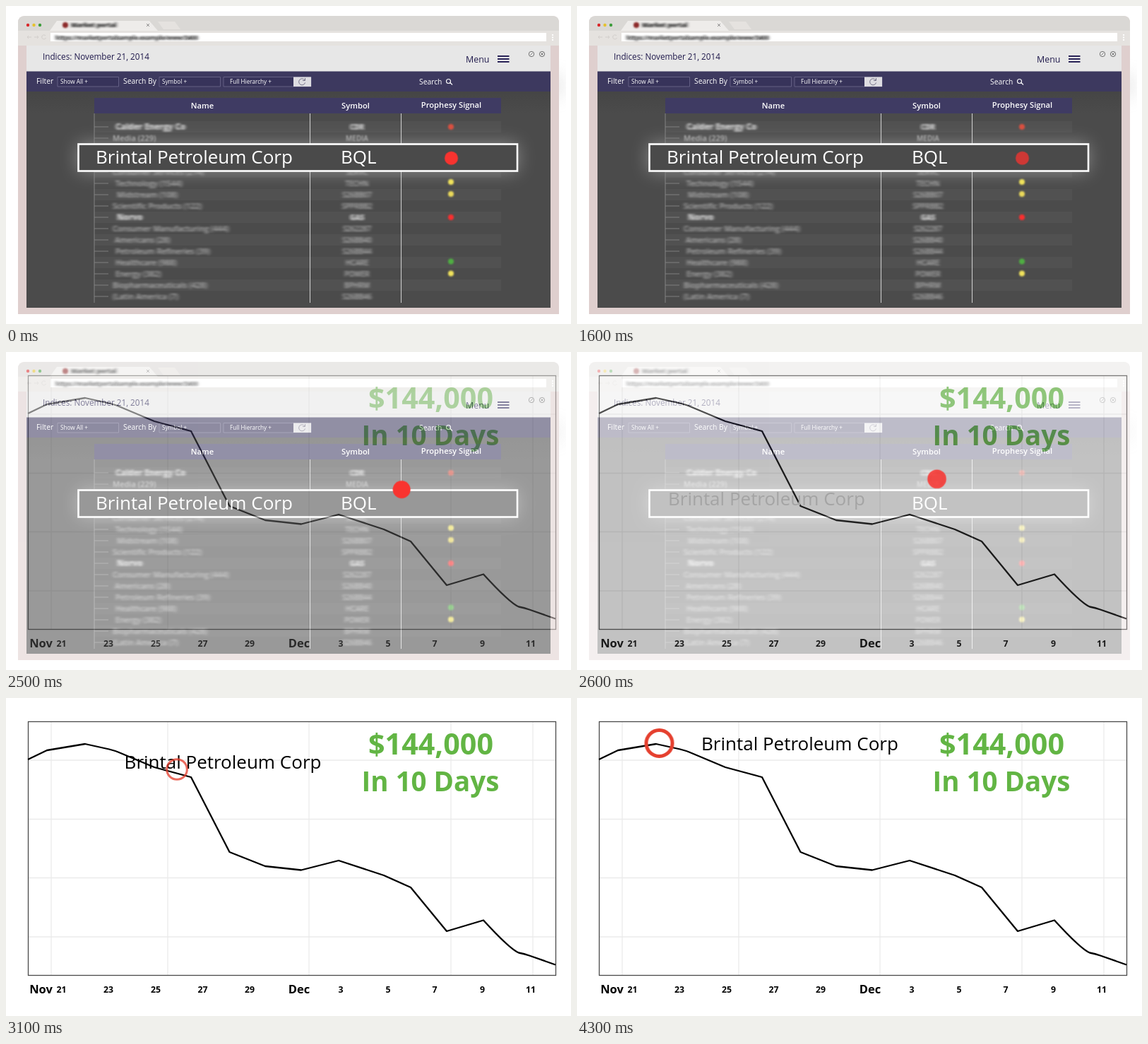
Write an HTML page that moves like this. It is 800 px wide and 450 px high and loops after 4.4 s.

```html
<!DOCTYPE html>
<html lang="en">
<head>
<meta charset="utf-8">
<title>Signal to chart</title>
<style>
  html, body { margin: 0; width: 100%; height: 100%; overflow: hidden; background: #fff; }
  svg { display: block; width: 800px; height: 450px; font-family: "Open Sans", "Noto Sans", sans-serif; }

  .grid { stroke: #ebebeb; stroke-width: 1.3; fill: none; }
  .axis { font-size: 12.3px; font-weight: 700; text-anchor: middle; }
  .axis .month { font-size: 16.5px; }
  .gain { fill: #62b544; font-weight: 700; text-anchor: middle; }
  .navy { fill: #201a4c; }
  .white { fill: #fff; }
  .label { font-size: 10.3px; font-weight: 500; }
  .field { font-size: 8.2px; font-weight: 500; }
  .head { font-size: 11.2px; font-weight: 600; text-anchor: middle; }
  .box { fill: #37335a; stroke: #6f6b8f; stroke-width: .8; }
  .rows { font-size: 11px; font-weight: 600; fill: #b4b4b4; }
  .rows .strong { font-weight: 800; font-size: 11.5px; fill: #d8d8d8; }
  .rows .symbol { text-anchor: middle; font-size: 10px; }
  .big { font-size: 26px; }

  .screen, .company, .mover, .dot, .ring { animation: 4.4s linear infinite; }
  .screen { animation-name: leave; }
  .company { animation-name: rise; }
  .mover { animation-name: travel; }
  .dot { fill: #f93430; animation-name: pulse; }
  .ring { fill: none; stroke: #e5402f; animation-name: open; }

  @keyframes leave {
    0%, 52.5% { opacity: 1; }
    62.5%, 100% { opacity: 0; }
  }
  @keyframes rise {
    0%, 56.8% { transform: translate(127px, 223px); fill: #fff; animation-timing-function: cubic-bezier(.35, 0, .65, 1); }
    62.5% { fill: #000; }
    75.5%, 100% { transform: translate(176px, 74px); fill: #000; }
  }
  @keyframes travel {
    0%, 52.1% { transform: translate(630.5px, 215.3px); animation-timing-function: cubic-bezier(.17, 0, .75, 1); }
    79.1%, 100% { transform: translate(116.5px, 64px); }
  }
  @keyframes pulse {
    0% { opacity: 1; r: 9.5px; animation-timing-function: ease-in-out; }
    24% { opacity: .5; animation-timing-function: ease-in-out; }
    48% { opacity: 1; }
    51.8% { r: 9.5px; }
    56.8% { opacity: 1; r: 12.5px; }
    63.64% { opacity: .6; r: 15px; }
    70.5%, 100% { opacity: 0; r: 18px; }
  }
  @keyframes open {
    0%, 58% { opacity: 0; r: 9px; stroke-width: 1px; }
    63.64% { opacity: .6; r: 11px; stroke-width: 1.5px; }
    79.1%, 100% { opacity: 1; r: 18.5px; stroke-width: 5px; }
  }
</style>
</head>
<body>
<svg viewBox="0 0 800 450">
  <defs>
    <filter id="smear" x="-10%" y="-40%" width="120%" height="180%"><feGaussianBlur stdDeviation="2 .9"/></filter>
    <filter id="soft" x="-50%" y="-50%" width="200%" height="200%"><feGaussianBlur stdDeviation=".8"/></filter>
    <filter id="glow" x="-20%" y="-200%" width="140%" height="500%"><feGaussianBlur stdDeviation="13"/></filter>
    <linearGradient id="shade" x2="0" y2="1">
      <stop stop-color="#454545"/><stop offset=".1" stop-color="#4b4b4b"/><stop offset="1" stop-color="#4b4b4b"/>
    </linearGradient>
  </defs>

  <g class="chart">
    <path class="grid" d="M64 33V392M229 33V392M429 33V392M630 33V392M746 33V392M31 88H778M31 171.500H778M31 254.500H778M31 338H778"/>
    <rect x="31.500" y="33.500" width="747" height="359" fill="none" stroke="#4a4a4a" stroke-width="1.300"/>
    <path fill="none" stroke="#000" stroke-width="2.300" stroke-linejoin="round"
      d="M31 87L58 74L112 65L146 72.500Q154 74.500 160 77L210 98L262 112L316.500 218L367 238L418 243.500L471 230L535 251L573 268L624 330L676 314.500Q713 355 726 360.500Q734 362 741 364.500L778 377.500"/>
    <g class="axis" id="axis"></g>
    <text class="gain" x="601.500" y="79.500" font-size="41.300">$144,000</text>
    <text class="gain" x="601" y="132" font-size="38.500">In 10 Days</text>
  </g>

  <g class="screen">
    <rect x="760" y="100" width="27" height="26" fill="#aaa" opacity=".35" filter="url(#glow)"/>
    <path fill="#dfcfce" d="M17 436V24Q17 14 27 14H773Q783 14 783 24V436Z"/>
    <path fill="#dad8d5" d="M17 56V24Q17 14 27 14H773Q783 14 783 24V56Z"/>
    <path fill="#e5e2df" d="M17 35H783V56H17ZM215 22H239L247 33H223Z"/>
    <path fill="#eeecea" d="M62 35L72 21H203L215 35Z"/>
    <circle cx="31" cy="27" r="2.200" fill="#d9282b"/>
    <circle cx="39.500" cy="27" r="2.200" fill="#e5c12e"/>
    <circle cx="48" cy="27" r="2.200" fill="#3e9d3c"/>
    <circle cx="84" cy="27" r="4" fill="#8c2929" filter="url(#soft)"/>
    <text x="92" y="30" font-size="9" font-weight="800" fill="#222" filter="url(#smear)">Market portal</text>
    <path stroke="#777" stroke-width=".8" d="M199 25l4 4m0-4l-4 4"/>
    <path fill="none" stroke="#d2cecb" d="M36 44h-6m2-2l-2 2 2 2M40 44h6m-2-2l2 2-2 2M56 42a3 3 0 1 0 .5 3"/>
    <rect x="63" y="38" width="702" height="12" class="white"/>
    <text x="70" y="47.500" font-size="8.300" font-weight="700" fill="#111" filter="url(#smear)">https://marketportalsample.example/www/3400</text>
    <path stroke="#fff" stroke-width="2" stroke-dasharray="2 1.500" d="M774 40V49"/>

    <rect x="29" y="56" width="742" height="37" fill="#e7e7e7"/>
    <text class="navy" x="52" y="76" font-size="11.700">Indices: November 21, 2014</text>
    <text class="navy" x="651" y="80" font-size="12.400">Menu</text>
    <path stroke="#2a2458" stroke-width="2.200" d="M696 71H712.500M696 75H712.500M696 79H712.500"/>
    <g fill="none" stroke="#666" stroke-width=".9">
      <circle cx="744" cy="68" r="3.700"/><circle cx="759" cy="68" r="3.700"/>
      <path d="M742.500 69.500l3-3M757.300 66.300l3.400 3.400m0-3.400l-3.400 3.400"/>
    </g>

    <rect x="29" y="121" width="742" height="306" fill="url(#shade)"/>
    <rect x="29" y="92.500" width="742" height="28.500" fill="#3d395f"/>
    <path class="box" d="M73 100.500H159.500V114H73ZM217 100.500H303.500V114H217ZM308 100.500H432V114H308Z"/>
    <rect x="407" y="100.500" width="25" height="13.500" fill="#dedde1"/>
    <path fill="none" stroke="#77758a" d="M423 105a4.500 4.500 0 1 0 .5 3.500M423.500 102v3.500h-3.500"/>
    <g class="white">
      <g class="label">
        <text x="43" y="110">Filter</text>
        <text x="166" y="110">Search By</text>
        <text x="585" y="110.500">Search</text>
      </g>
      <g class="field">
        <text x="77" y="110">Show All +</text>
        <text x="221" y="110">Symbol +</text>
        <text x="317" y="110">Full Hierarchy +</text>
      </g>
    </g>
    <path fill="none" stroke="#fff" stroke-width="1.100" d="M629 108.500l3 3M623.500 106.500a3 3 0 1 1 6 0a3 3 0 1 1 -6 0"/>

    <g id="stripes" fill="#515151"></g>
    <rect x="102" y="195" width="622" height="39" class="white" opacity=".36" filter="url(#glow)"/>
    <rect x="125" y="130" width="576" height="22" fill="#3f3b63"/>
    <g class="head white">
      <text x="278" y="145">Name</text>
      <text x="495" y="145">Symbol</text>
      <text x="630.500" y="144">Prophesy Signal</text>
    </g>
    <path stroke="#8c8c8c" stroke-width=".9" d="M125 152V420"/>
    <path id="ticks" stroke="#858585" stroke-width=".9"/>
    <g class="rows" id="rows"></g>
    <path stroke="#d2d2d2" d="M430.500 152V420M559.500 152V420"/>
    <g id="signals" filter="url(#soft)"></g>

    <rect x="102.500" y="195.500" width="621.500" height="38" fill="#4a4a4a" stroke="#fff" stroke-width="2.600"/>
    <text class="big white" x="474" y="223">BQL</text>
  </g>

  <text class="big company">Brintal Petroleum Corp</text>
  <g class="mover">
    <circle class="dot" r="9.500"/>
    <circle class="ring" r="9"/>
  </g>
</svg>
<script>
  const NS = "http://www.w3.org/2000/svg";
  const byId = id => document.getElementById(id);

  function add(parent, tag, attrs, text = "") {
    const node = document.createElementNS(NS, tag);
    for (const key in attrs) node.setAttribute(key, attrs[key]);
    node.textContent = text;
    parent.append(node);
  }

  const axis = byId("axis");
  const days = { 21: 78.5, 23: 145, 25: 212, 27: 278.5, 29: 345, 3: 474, 5: 541, 7: 607, 9: 674.5, 11: 743 };
  for (const day in days) add(axis, "text", { x: days[day], y: 416.5 }, day);
  add(axis, "text", { x: 49.5, y: 417.5, class: "month" }, "Nov");
  add(axis, "text", { x: 415, y: 417.5, class: "month" }, "Dec");

  // Name, symbol, left edge; empty rows sit behind the highlight.
  const rows = [
    ["Calder Energy Co", "CDR", 155], ["Media (229)", "MEDIA", 151], [], [],
    ["Consumer Services (214)", "SERVC", 151], ["Technology (1544)", "TECHN", 155],
    ["Midstream (108)", "S26BB07", 157], ["Scientific Products (122)", "SPPRBB2", 151],
    ["Norvo", "GAS", 157], ["Consumer Manufacturing (444)", "S262287", 151],
    ["Americans (28)", "S26BB40", 154], ["Petroleum Refineries (39)", "S26BB44", 155],
    ["Healthcare (988)", "HCARE", 155], ["Energy (382)", "POWER", 155],
    ["Biopharmaceuticals (428)", "BPHRM", 151], ["(Latin America (7)", "S26BB46", 151]
  ];
  let ticks = "";
  rows.forEach(([name, symbol, x], i) => {
    const y = 171 + 16 * i;
    if (i % 2 === 0) add(byId("stripes"), "rect", { x: 125, y: y - 8, width: 576, height: 16 });
    if (!name) return;
    const strong = i === 0 || i === 8 ? "strong" : "";
    const filter = `url(#${i === 1 ? "soft" : "smear"})`;
    ticks += `M125 ${y}H145`;
    add(byId("rows"), "text", { x, y: y + 3.5, class: strong, filter }, name);
    add(byId("rows"), "text", { x: 497, y: y + 4, class: "symbol " + strong, filter }, symbol);
  });
  byId("ticks").setAttribute("d", ticks);

  const signals = [[171, "#d9503f"], [249, "#f0e25c"], [266, "#ead95a"], [299, "#fb2d2d"], [361.5, "#4fae42"], [378.5, "#f0e25c"]];
  for (const [cy, fill] of signals) add(byId("signals"), "circle", { cx: 630, cy, r: 4, fill });
</script>
</body>
</html>
```
